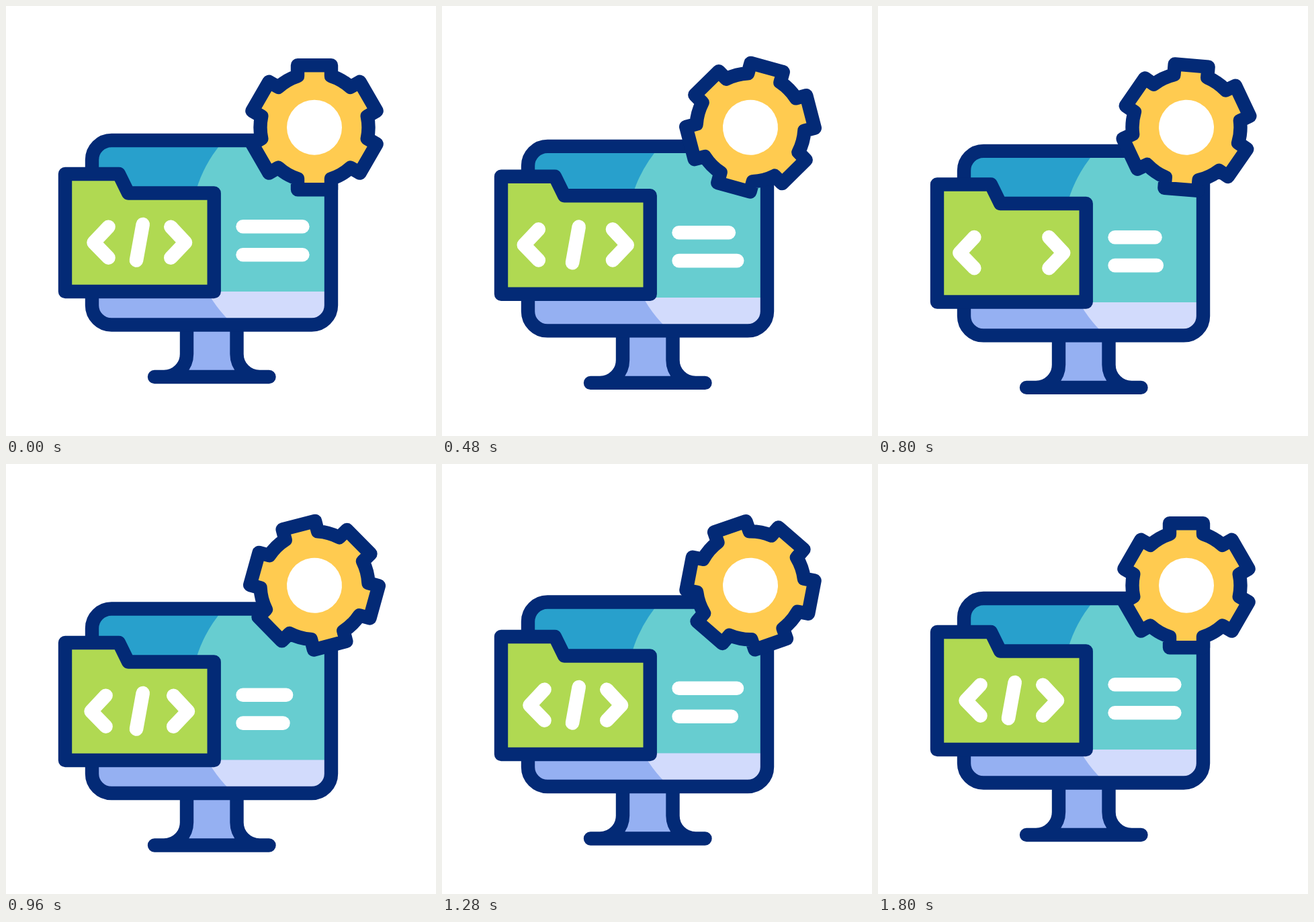
Recreate the animation shown at these times as an HTML page. Size 640 px wide and 640 px high, loop 2 s.

```html
<!DOCTYPE html>
<html lang="en">
<head>
<meta charset="utf-8">
<title>Web development</title>
<style>
  html, body { margin: 0; width: 100%; height: 100%; overflow: hidden; background: #fff; }
  svg { display: block; width: 100%; height: 100%; }
  .ink { fill: none; stroke: #032a76; stroke-width: 20.4; stroke-linecap: round; stroke-linejoin: round; }
  .chalk { fill: none; stroke: #fff; stroke-width: 20.6; stroke-linecap: round; stroke-linejoin: round; }
</style>
</head>
<body>
<svg viewBox="0 0 640 640">
  <clipPath id="screen"><rect x="128" y="200" width="356" height="274.5" rx="29"/></clipPath>

  <g id="monitor">
    <path fill="#95b0f2" d="M269 475V518A34 34 0 0 1 235 552H377.500A34 34 0 0 1 343.500 518V475Z"/>
    <path class="ink" d="M269 475V518A34 34 0 0 1 235 552M343.500 475V518A34 34 0 0 0 377.500 552M221 552H391.500"/>
    <g clip-path="url(#screen)">
      <rect x="128" y="200" width="356" height="275" fill="#28a0cc"/>
      <circle cx="470.600" cy="330" r="195.700" fill="#67cdd0"/>
      <g clip-path="url(#base)">
        <rect x="128" y="425" width="356" height="50" fill="#95b0f2"/>
        <circle cx="470.600" cy="330" r="195.700" fill="#d2dbfc"/>
      </g>
    </g>
    <clipPath id="base"><rect x="128" y="425" width="356" height="50"/></clipPath>
    <rect class="ink" x="128" y="200" width="356" height="274.500" rx="29"/>
    <path id="line1" class="chalk"/>
    <path id="line2" class="chalk"/>
  </g>

  <g id="folder">
    <path class="ink" style="fill:#b0d952" d="M88 250H168L182 278.500H309.700V425H88Z"/>
    <path id="left" class="chalk" d="M152.500 328.700L130.500 352L152.500 374.700"/>
    <path id="slash" class="chalk" d="M203.700 325L194 378.500"/>
    <path id="right" class="chalk" d="M245.300 328.700L267 352L245.300 374.700"/>
  </g>

  <g id="gear">
    <path id="cog" class="ink" style="fill:#ffcb50"/>
    <circle r="41" fill="#fff"/>
  </g>
</svg>
<script>
const $ = id => document.getElementById(id);

// Six square teeth joined by arcs of the body circle.
function cogPath(teeth, body, tip, half) {
  const root = Math.sqrt(body * body - half * half);
  const corners = [[-half, -root], [-half, -tip], [half, -tip], [half, -root]];
  let path = '';
  for (let i = 0; i < teeth; i++) {
    const angle = i * 2 * Math.PI / teeth, c = Math.cos(angle), s = Math.sin(angle);
    corners.forEach(([x, y], k) => {
      const command = k ? 'L' : i ? `A${body} ${body} 0 0 1 ` : 'M';
      path += `${command}${x * c - y * s} ${x * s + y * c}`;
    });
  }
  return `${path}A${body} ${body} 0 0 1 ${-half} ${-root}Z`;
}

// cubic-bezier(a, 0, 1 - a, 1)
function ease(x, a) {
  if (x <= 0) return 0;
  if (x >= 1) return 1;
  let low = 0, high = 1, p;
  for (let i = 0; i < 24; i++) {
    p = (low + high) / 2;
    const q = 1 - p;
    if (3 * p * q * (q * a + p * (1 - a)) + p ** 3 < x) low = p; else high = p;
  }
  return p * p * (3 - 2 * p);
}

const ramp = (t, from, to, a = 0.5) => ease((t - from) / (to - from), a);
const outAndBack = (t, start, peak, leave, end) => ramp(t, start, peak) - ramp(t, leave, end);
const shift = (id, x, y) => $(id).setAttribute('transform', `translate(${x} ${y})`);
const bar = (id, y, cut) => $(id).setAttribute('d', `M352.600 ${y}H${441.300 - cut}`);

function draw(t) {
  shift('monitor', 0, 16 * outAndBack(t, 65, 850, 850, 1590));
  shift('folder', 0, 16 * outAndBack(t, 255, 895, 950, 1570));

  const spread = 10.5 * outAndBack(t, 100, 650, 650, 1200);
  shift('left', -spread, 0);
  shift('right', spread, 0);
  $('slash').setAttribute('visibility', t >= 700 && t < 920 ? 'hidden' : 'visible');

  bar('line1', 328.3, 29 * outAndBack(t, 205, 755, 755, 1430));
  bar('line2', 370.2, 29 * outAndBack(t, 360, 930, 930, 1545));

  $('gear').setAttribute('transform', `translate(459 180.700) rotate(${180 * ramp(t, 40, 1760, 0.6)})`);
}

const LOOP = 2000, STEP = 40;
function tick() {
  draw(Math.floor(performance.now() % LOOP / STEP) * STEP);
  requestAnimationFrame(tick);
}

$('cog').setAttribute('d', cogPath(6, 80.5, 92.5, 25));
tick();
</script>
</body>
</html>
```
